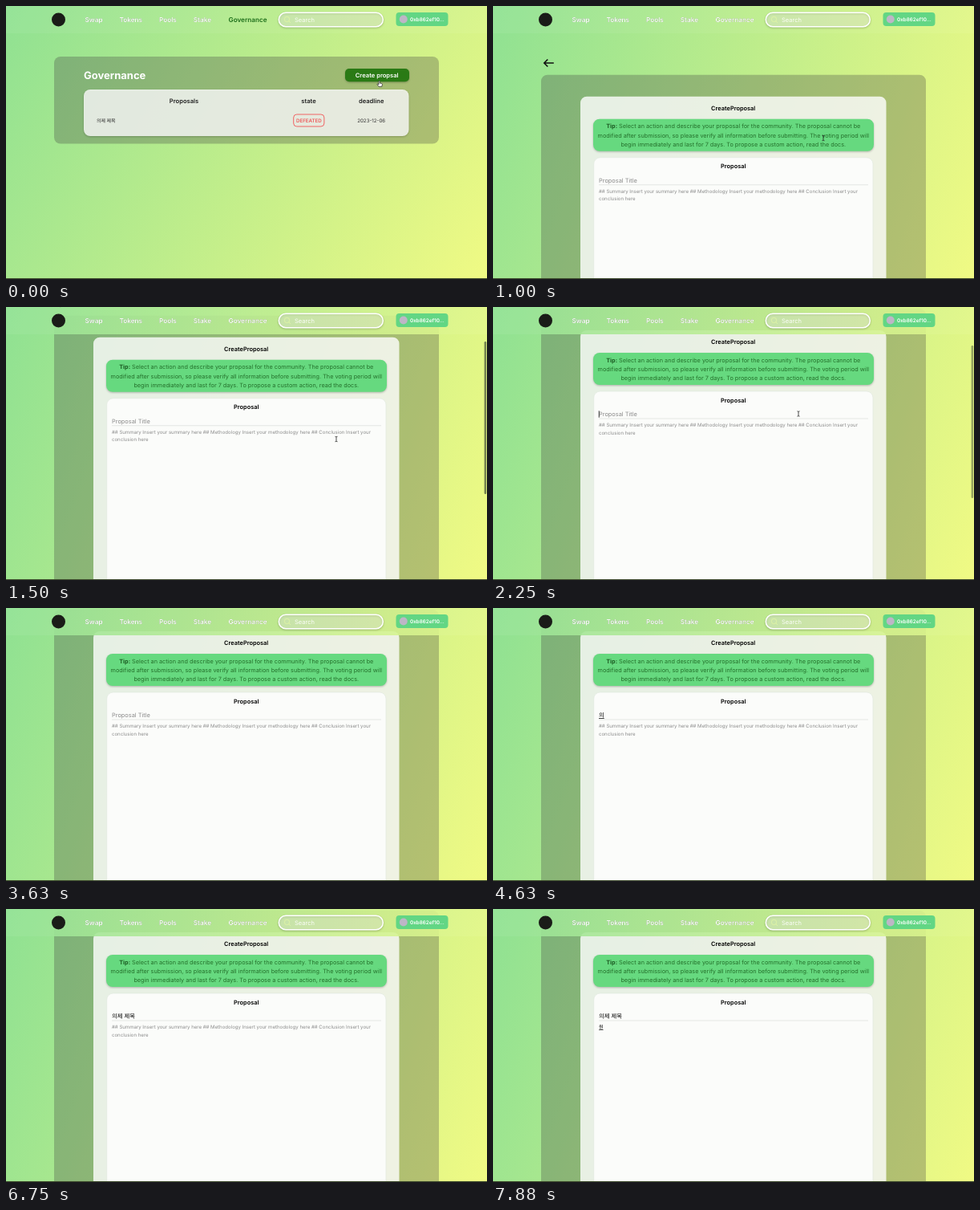
These frames come from a looping animation (600x340 px, 8 s). An HTML page:

```html
<!DOCTYPE html>
<html lang="en">
<head>
<meta charset="utf-8">
<title>Governance</title>
<style>
  html, body { margin: 0; width: 100%; height: 100%; overflow: hidden; }
  svg { display: block; width: 100vw; height: 100vh; }
  text {
    font: 400 7.3px Inter, "Noto Sans CJK KR", "Noto Sans CJK JP", "Noto Sans CJK", sans-serif;
    text-rendering: geometricPrecision;
    white-space: pre;
  }
  .mid text, text.mid { text-anchor: middle; }
  .nav text { font-size: 8.2px; font-weight: 600; fill: #fff; filter: drop-shadow(0 .8px .6px rgba(0,0,0,.4)); }
  .nav text.active { fill: #1f701c; filter: none; }
  .head text { font-size: 7.6px; font-weight: 600; fill: #222; }
  .title { font-size: 7.4px; font-weight: 600; }
  .tip text { font-size: 7.28px; fill: #24702b; }
  .tip tspan { font-weight: 700; fill: #1c5a22; }
  .hint { fill: #8c8c8c; }
  .small { font-size: 6.07px; }
  .live { text-decoration: underline; }
  .soft { filter: drop-shadow(0 1px 1px rgba(0,0,0,.25)); }
</style>
</head>
<body>
<svg viewBox="0 0 600 340" preserveAspectRatio="none">
  <defs>
    <linearGradient id="listBg" gradientUnits="userSpaceOnUse" x1="0" y1="0" x2="591" y2="355">
      <stop offset="0" stop-color="#8fe192"/><stop offset="1" stop-color="#f0fa84"/>
    </linearGradient>
    <linearGradient id="formBg" gradientUnits="userSpaceOnUse" x1="0" y1="0" x2="640" y2="224">
      <stop offset="0" stop-color="#8fe192"/><stop offset="1" stop-color="#f0fa84"/>
    </linearGradient>
  </defs>

  <g id="list">
    <rect width="600" height="340" fill="url(#listBg)"/>
    <rect x="60" y="63" width="480" height="108.5" rx="8" fill="rgba(64,64,64,.3)"/>
    <text x="97" y="91" style="font-size:13px;font-weight:700" fill="#fff">Governance</text>
    <rect class="soft" x="423" y="78" width="80" height="16.3" rx="5" fill="#2a7a15"/>
    <text class="mid" x="462.7" y="89" style="font-size:7.6px;font-weight:600" fill="#fff">Create propsal</text>
    <rect class="soft" x="97" y="104" width="405.5" height="58" rx="8" fill="rgba(255,255,255,.8)"/>
    <g class="head mid">
      <text x="222" y="121">Proposals</text>
      <text x="377.5" y="121">state</text>
      <text x="455.7" y="121">deadline</text>
    </g>
    <text x="113" y="144.7" style="font-size:5.95px;font-weight:500" fill="#222">의제 제목</text>
    <rect x="358.7" y="135" width="38.2" height="15" rx="4" fill="none" stroke="#f06464"/>
    <text class="mid" x="377.9" y="144.8" style="font-size:6.2px;font-weight:600" fill="#ee5c5c">DEFEATED</text>
    <text class="mid" x="455.7" y="144.7" style="font-size:6.2px" fill="#333">2023-12-06</text>
  </g>

  <g id="form">
    <rect width="600" height="340" fill="url(#formBg)"/>
    <g id="page">
      <path d="M75.8 71.2H63.8M68.3 66.7L63.8 71.2L68.3 75.7" fill="none" stroke="#111" stroke-width="1.6"/>
      <rect x="60" y="86" width="480" height="500" rx="8" fill="rgba(64,64,64,.3)"/>
      <rect x="109" y="113" width="381.5" height="450" rx="8" fill="rgba(255,255,255,.8)"/>
      <text class="title mid" x="299.7" y="130">CreateProposal</text>
      <rect class="soft" x="125" y="141" width="350" height="40" rx="8" fill="#66d97f"/>
      <g class="tip mid">
        <text x="299.8" y="152.7"><tspan>Tip:</tspan> Select an action and describe your proposal for the community. The proposal cannot be</text>
        <text x="299.8" y="163.9">modified after submission, so please verify all information before submitting. The voting period will</text>
        <text x="299.8" y="175.1">begin immediately and last for 7 days. To propose a custom action, read the docs.</text>
      </g>
      <rect x="125.7" y="189" width="348.3" height="360" rx="8" fill="#fbfcfa" stroke="#dde6dc" stroke-width=".6"/>
      <text class="title mid" x="299.7" y="202.5">Proposal</text>
      <path d="M132 223H468" stroke="#dfe1df" stroke-width=".8"/>
      <text id="titleHint" class="hint" x="132" y="220.4" style="font-size:7.4px">Proposal Title</text>
      <text id="title" x="132" y="220.2"><tspan></tspan><tspan class="live"></tspan></text>
      <g id="bodyHint">
        <text class="hint small" x="132" y="233.2">## Summary Insert your summary here ## Methodology Insert your methodology here ## Conclusion Insert your</text>
        <text class="hint small" x="132" y="242.7">conclusion here</text>
      </g>
      <text id="body" class="small" x="132" y="233.3"><tspan></tspan><tspan class="live"></tspan></text>
      <rect id="caret" x="131.8" width=".8" fill="#111"/>
    </g>
    <rect width="600" height="34" fill="url(#formBg)" opacity=".88"/>
  </g>

  <g id="header">
    <rect width="600" height="34" fill="rgba(255,255,255,.05)"/>
    <circle cx="65.5" cy="17" r="8.5" fill="#1a1c18"/>
    <g class="nav">
      <text x="98.5" y="19.8">Swap</text>
      <text x="141.5" y="19.8">Tokens</text>
      <text x="191" y="19.8">Pools</text>
      <text x="233.8" y="19.8">Stake</text>
      <text id="gov" x="277.5" y="19.8">Governance</text>
    </g>
    <rect class="soft" x="340.3" y="8.3" width="130" height="17.4" rx="8.7" fill="rgba(255,255,255,.3)" stroke="#fff" stroke-width="1.5"/>
    <g fill="none" stroke="#e3f7a4" stroke-width=".8">
      <circle cx="350.5" cy="16.5" r="3.2"/><path d="M352.8 18.8L355 21"/>
    </g>
    <text x="360" y="19.7" style="font-size:7.5px" fill="rgba(255,255,255,.9)">Search</text>
    <rect x="486.5" y="8" width="65" height="17" rx="4" fill="#62d684"/>
    <circle cx="495.8" cy="16.5" r="5" fill="#bdb6c6"/>
    <text x="504" y="18.9" style="font-size:6.35px;font-weight:600" fill="#fff">0xb862ef10...</text>
  </g>

  <rect id="thumb" x="596.6" width="2.6" height="190" rx="1.3" fill="#4c5a3c"/>
  <path id="hand" d="M-1 -3.4q.8 -.8 1.4 0V-.9l2.3 .5q.8 .2 .7 1L2.8 3.4H-.9L-3 .7q0 -1 1 -.6l1 .8z" fill="#fff" stroke="#222" stroke-width=".7"/>
  <path id="beam" d="M-1.5 -3.2Q0 -3.2 0 -2.4Q0 -3.2 1.5 -3.2M0 -2.4V2.4M-1.5 3.2Q0 3.2 0 2.4Q0 3.2 1.5 3.2" fill="none" stroke="#222" stroke-width=".8"/>
  <rect y="339" width="600" height="1" fill="#3d4a2c"/>
</svg>
<script>
const LOOP = 8000, OPEN = 500;
const $ = id => document.getElementById(id);
const show = (id, on) => { $(id).style.display = on ? "" : "none"; };
const part = (t, a, b) => Math.min(1, Math.max(0, (t - a) / (b - a)));
const easeOut = p => 1 - (1 - p) ** 2;
const smooth = p => p * p * (3 - 2 * p);
const mix = (a, b, p) => a + (b - a) * p;

// [time, committed text, syllable being composed]
const titleKeys = [
  [4380, "", "ㅇ"], [4630, "", "의"], [4750, "", "읮"], [4880, "의", "제"],
  [5130, "의제 ", ""], [5250, "의제 ", "ㅈ"], [5380, "의제 ", "제"], [5500, "의제 ", "젬"],
  [5750, "의제 ", "제모"], [5880, "의제 제", "목"], [6250, "의제 제목", ""]
];
const bodyKeys = [[7250, "", "ㅇ"], [7380, "", "우"], [7500, "", "워"], [7630, "", "원"]];

function type(id, hint, keys, t) {
  const key = keys.filter(k => k[0] <= t).pop() || [0, "", ""];
  const spans = $(id).children;
  spans[0].textContent = key[1];
  spans[1].textContent = key[2];
  show(hint, !(key[1] + key[2]));
}

function drawCursor(t) {
  const across = smooth(part(t, 450, 900)), up = smooth(part(t, 1650, 2050));
  const x = mix(mix(466, 412, across), 381, up);
  const y = mix(mix(97, 164.5, across), 133, up);
  show("hand", t < OPEN);
  show("beam", t >= OPEN && t < 3000);
  for (const id of ["hand", "beam"]) $(id).setAttribute("transform", `translate(${x} ${y})`);
}

function draw(t) {
  const open = t >= OPEN;
  show("list", !open);
  show("form", open);
  $("gov").classList.toggle("active", !open);

  const scroll = 84 * easeOut(part(t, 1000, 1740));
  $("page").setAttribute("transform", `translate(0 ${-scroll})`);
  $("thumb").setAttribute("y", scroll * 0.572);
  $("thumb").setAttribute("opacity", 0.75 * part(t, 1000, 1100) * (1 - part(t, 2150, 2500)));

  type("title", "titleHint", titleKeys, t);
  type("body", "bodyHint", bodyKeys, t);

  const inBody = t >= 6500;
  const idle = t >= 2120 && t < 4380 || inBody && t < 7250;
  show("caret", idle && t % 1000 < 500);
  $("caret").setAttribute("y", inBody ? 227.5 : 213.3);
  $("caret").setAttribute("height", inBody ? 7 : 8.4);

  drawCursor(t);
}

const start = performance.now();
function tick() {
  draw((performance.now() - start) % LOOP);
  requestAnimationFrame(tick);
}
tick();
</script>
</body>
</html>
```
